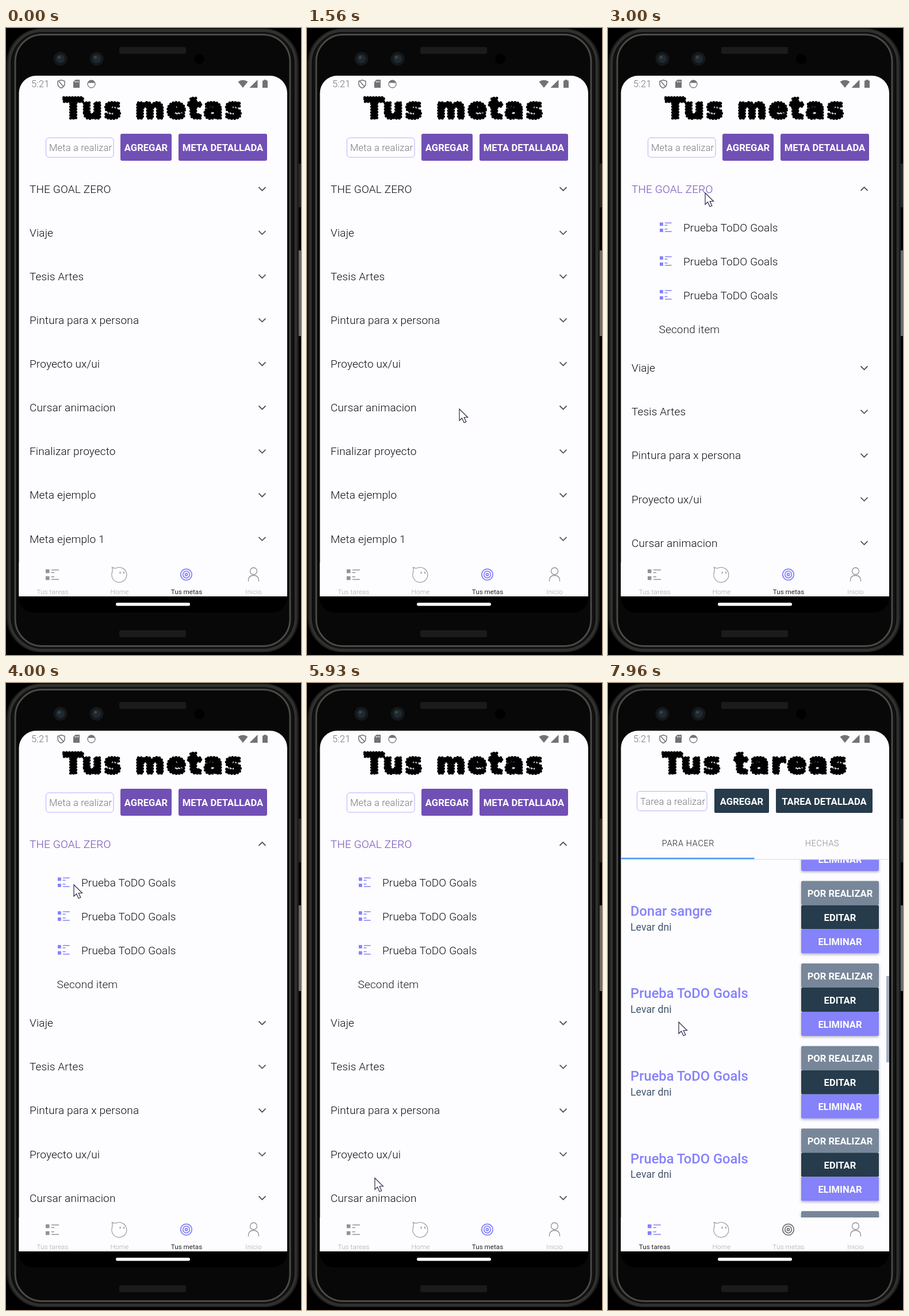
An HTML page for the animation above (8000 ms loop, 513 by 1091 pixels).

```html
<!DOCTYPE html>
<html lang="es">
<head>
<meta charset="utf-8">
<title>Tus metas</title>
<style>
html, body { margin: 0; width: 100%; height: 100%; overflow: hidden; background: #000; }
svg { display: block; width: 100%; height: 100%; font-family: Roboto, sans-serif; }
.title { font: 700 49px "DejaVu Sans", sans-serif; letter-spacing: 3.8px; stroke: #000; stroke-width: 5; stroke-linecap: round; stroke-dasharray: 0 5; }
.goals, .closed, .open, .tasks, .cursor { animation: 8s infinite step-end; }
.goals { animation-name: goals; }
.closed { animation-name: closed; }
.open { animation-name: open; }
.tasks { animation-name: tasks; }
.cursor { animation-name: move; animation-timing-function: ease-in-out; }
@keyframes closed { 0% { visibility: visible } 34.125%, 100% { visibility: hidden } }
@keyframes open { 0% { visibility: hidden } 34.125% { visibility: visible } 83.25%, 100% { visibility: hidden } }
@keyframes goals { 0% { visibility: visible } 83.25%, 100% { visibility: hidden } }
@keyframes tasks { 0% { visibility: hidden } 83.25%, 100% { visibility: visible } }
@keyframes move {
  0%, 16.62% { opacity: 0; transform: translate(272px, 845px) }
  16.625% { opacity: 1; transform: translate(272px, 845px) }
  19.5% { transform: translate(265px, 663px) }
  26.6% { transform: translate(200px, 312px) }
  30.75%, 44.25% { transform: translate(169px, 287px) }
  50% { transform: translate(118px, 351px) }
  53.25%, 55.375% { transform: translate(112px, 347px) }
  62% { transform: translate(285px, 341px) }
  65.4% { transform: translate(272px, 400px) }
  75.75% { transform: translate(110px, 885px) }
  81.25%, 85% { transform: translate(83px, 941px) }
  93.25% { transform: translate(140px, 690px) }
  99.5%, 100% { opacity: 1; transform: translate(123px, 590px) }
}
</style>
</head>
<body>
<svg id="stage" viewBox="0 0 513 1091" preserveAspectRatio="none"></svg>
<script>
const INK = '#242428', VIOLET = '#8582fa', PURPLE = '#7150b5', NAVY = '#263b4b', SLATE = '#778799', GREY = '#929296';
const LIGHT = 'font-weight="300" letter-spacing=".15"';

const rect = (x, y, w, h, fill, r = 0, more = '') =>
  `<rect x="${x}" y="${y}" width="${w}" height="${h}" rx="${r}" fill="${fill}" ${more}/>`;
const circle = (x, y, r, fill, more = '') => `<circle cx="${x}" cy="${y}" r="${r}" fill="${fill}" ${more}/>`;
const line = (d, stroke, w = 1.5, fill = 'none') =>
  `<path d="${d}" fill="${fill}" stroke="${stroke}" stroke-width="${w}"/>`;
const group = (cls, ...parts) => `<g class="${cls}">${parts.join('')}</g>`;
const at = (x, y, body) => `<g transform="translate(${x} ${y})">${body}</g>`;

// y is the middle of the capital letters
const text = (s, x, y, size, fill, more = '') =>
  `<text x="${x}" y="${y + size * .355}" font-size="${size}" fill="${fill}" ${more}>${s}</text>`;
const mid = (s, x, y, size, fill, more = '') => text(s, x, y, size, fill, 'text-anchor="middle" ' + more);
const title = s => `<text class="title" x="257" y="157" text-anchor="middle">${s}</text>`;

const button = (s, x, y, w, h, fill, r = 2) =>
  rect(x, y, w, h, fill, r) + mid(s, x + w / 2, y + h / 2 + .8, 16.6, '#fff', 'font-weight="700"');
const input = (s, x, y, w) =>
  rect(x, y, w, 34, '#fefdff', 5, 'stroke="#b5b1fb"') + text(s, x + 5.5, y + 17.5, 16.6, '#77777b', LIGHT);

function phone() {
  const slot = y => rect(197, y, 116, 12, '#1b1b1b', 3);
  const lens = x => circle(x, 53.5, 12, '#14181a') + circle(x, 53.5, 7.5, '#20292f') + circle(x - 2, 51, 2.5, '#354650');
  const ring = (inset, r, color, w) =>
    rect(1 + inset, 1 + inset * .7, 508 - inset * 2, 1085 - inset * 1.4, '#080808', r, `stroke="${color}" stroke-width="${w}"`);
  return rect(0, 0, 513, 1091, '#000') +
    rect(507, 236, 6, 76, '#262626') + rect(509, 387, 4, 149, '#6a6a6a') +
    ring(1, 60, '#1d1d1c', 2) + ring(5, 57, '#30302e', 5) +
    ring(11, 51, '#121212', 3) + ring(15, 47, '#4a4a47', 3) +
    slot(33) + slot(1048) + lens(94.5) + lens(157.5) + circle(336, 54, 9, '#000') +
    rect(22, 900, 467, 117, '#000', 26) +
    line('M22.5 989V113A30 30 0 0 1 52.500 83H459A30 30 0 0 1 489 113V989Z', 'none', 0, '#fdfcff') +
    rect(191, 1000, 129, 5.5, '#fff', 2.7);
}

function statusBar() {
  const c = '#727276';
  return text('5:21', 44, 97.5, 16.6, c, LIGHT) +
    line('M96 90.5L102 92.5V97Q102 102 96 104.5Q90 102 90 97V92.5ZM92 93L100 102', c, 1.5) +
    line('M120.500 90H128V104H117V94Z', 'none', 0, c) +
    line('M120.500 92V95M123 92V95M125.500 92V95', '#fdfcff', 1) +
    circle(148.5, 97.5, 6.5, 'none', `stroke="${c}" stroke-width="1.3"`) +
    line('M142.500 95.500A6.500 6.500 0 0 1 154.500 95.500Z', 'none', 0, c) +
    line('M403.500 93.500Q412 87.500 420.500 93.500L412 104Z', 'none', 0, c) +
    line('M437.500 90V104H423.500Z', 'none', 0, c) +
    line('M446 91.500H448.500V90H452.500V91.500H455V104H446Z', 'none', 0, c);
}

const listIcon = c => rect(0, 1, 6.5, 6.5, c) + rect(0, 13, 6.5, 6.5, c) +
  line('M10 2H23M9.500 6.500H15M9.500 14H15M10 18.500H23', c, 1.7);

function tabBar(active) {
  const c = i => i === active ? VIOLET : GREY;
  const ring = r => circle(313.5, 951, r, 'none', `stroke="${active === 2 ? VIOLET : '#77777b'}" stroke-width="1.8"`);
  const labels = ['Tus tareas', 'Home', 'Tus metas', 'Inicio'];
  const label = (s, i) => mid(s, 81 + i * 116.5, 981, 11.7, i === active ? INK : '#a4a4a8', i === active ? '' : LIGHT);
  return rect(22.5, 930, 466.500, 59, '#fdfcff') +
    at(69, 941, listIcon(c(0))) +
    line('M184.500 938.500Q189 941 192 939.500A13 13 0 1 1 184.500 947.500Q186 943 184.500 938.500Z', GREY, 1.1) +
    line('M198.500 946V949.500M205 946V949.500', GREY, 1.6) +
    [9.7, 5.8, 2].map(ring).join('') +
    circle(430.5, 945, 6, 'none', `stroke="${GREY}" stroke-width="1.3"`) +
    line('M421.500 963V961Q422 952.500 430.500 952.500Q439 952.500 439.500 961V963', GREY, 1.3) +
    labels.map(label).join('');
}

function goalRow(s, y, open) {
  const d = open ? 3 : -3;
  return text(s, 41, y, 19, open ? PURPLE : '#0c0c10', LIGHT) +
    line(`M439.500 ${y + d}L445.500 ${y - d}L451.500 ${y + d}`, '#525256', 1.8);
}

const goals = ['THE GOAL ZERO', 'Viaje', 'Tesis Artes', 'Pintura para x persona', 'Proyecto ux/ui',
  'Cursar animacion', 'Finalizar proyecto', 'Meta ejemplo', 'Meta ejemplo 1'];
const STEP = 76.1;

const closedList = () => goals.map((s, i) => goalRow(s, 280 + i * STEP)).join('');

function openList() {
  const items = [347.5, 406.3, 465].map(y =>
    at(90, y - 10, `<g transform="scale(.9)">${listIcon(VIOLET)}</g>`) +
    text('Prueba ToDO Goals', 131, y, 19, '#0c0c10', LIGHT));
  return goalRow(goals[0], 280, true) + items.join('') + text('Second item', 88.5, 524, 19, '#1c1c20', LIGHT) +
    goals.slice(1, 6).map((s, i) => goalRow(s, 591.5 + i * STEP)).join('');
}

function taskRow(k) {
  const y = 344.5 + k * 143.6;
  const name = k > 0 ? 'Prueba ToDO Goals' : 'Donar sangre';
  return rect(336, y, 135, 126, '#fff', 2, 'filter="url(#drop)"') +
    button('POR REALIZAR', 336, y, 135, 42, SLATE) +
    button('EDITAR', 336, y + 42, 135, 42, NAVY) +
    button('ELIMINAR', 336, y + 84, 135, 42, VIOLET) +
    text(name, 39, y + 51.8, 23.7, VIOLET, 'font-weight="500"') +
    text('Levar dni', 39, y + 79.8, 17.8, '#42566b');
}

function goalsHead() {
  return title('Tus metas') + input('Meta a realizar', 69.5, 191, 117.5) +
    button('AGREGAR', 199, 184, 89, 47, PURPLE, 3) +
    button('META DETALLADA', 300, 184, 154, 47, PURPLE, 3);
}

function tasksPage() {
  const spaced = 'font-weight="300" letter-spacing=".75"';
  return title('Tus tareas') + input('Tarea a realizar', 50.5, 188.5, 121.5) +
    button('AGREGAR', 185, 184, 95, 42, NAVY) +
    button('TAREA DETALLADA', 292, 184, 168, 42, NAVY) +
    mid('PARA HACER', 139.5, 279, 14.3, '#1c1c20', spaced) +
    mid('HECHAS', 372.5, 279, 14.3, '#88888c', spaced) +
    `<g clip-path="url(#list)">${[-1, 0, 1, 2, 3, 4].map(taskRow).join('')}</g>` +
    rect(22.5, 306.5, 466.500, 1, '#d9dce4') + rect(22.5, 304, 232, 2.5, '#4a9cf0') +
    rect(484, 510, 5, 150, '#a6aec1');
}

const arrow = line('M0 0V20L4.500 15.800L8.200 23.800L11.800 22.200L8.200 14.500H14.500Z', '#2b2b45', 1.2, '#fdfcff');

document.getElementById('stage').innerHTML =
  `<defs><clipPath id="list">${rect(22, 307, 467, 623, '#000')}</clipPath>
  <filter id="drop" x="-10%" y="-10%" width="120%" height="120%">
    <feDropShadow dx="0" dy="2" stdDeviation="2" flood-color="#556" flood-opacity=".45"/></filter></defs>` +
  phone() + statusBar() +
  group('goals', goalsHead(), tabBar(2)) +
  group('closed', closedList()) + group('open', openList()) +
  group('tasks', tasksPage(), tabBar(0)) +
  group('cursor', arrow);
</script>
</body>
</html>
```
